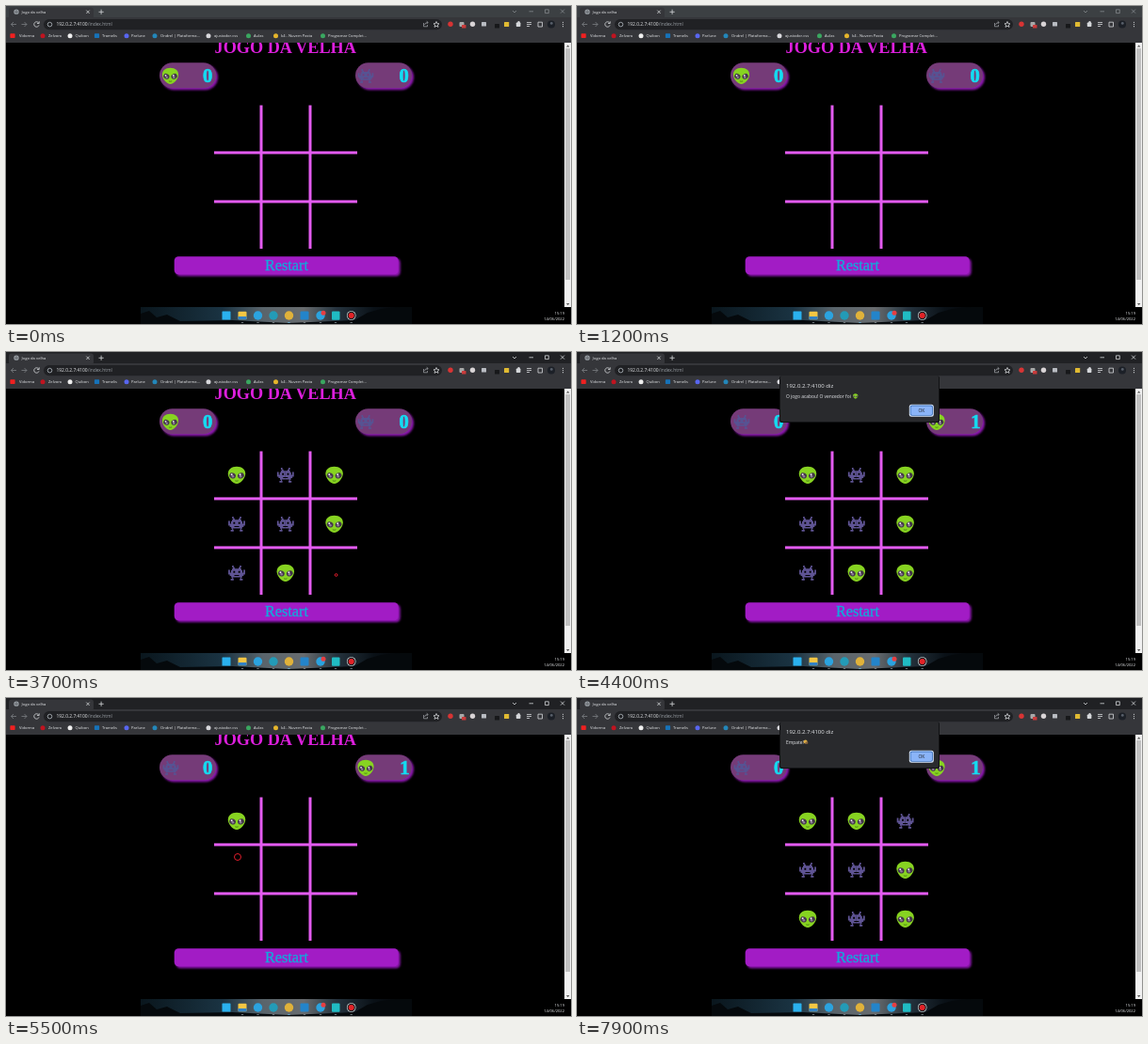
Write an HTML page that moves like this. It is 600 by 338 pixels and loops after 8000 ms.

```html
<!DOCTYPE html>
<html lang="pt-BR">
<head>
<meta charset="utf-8">
<title>Jogo da velha</title>
<style>
html, body { margin: 0; width: 100%; height: 100%; overflow: hidden; background: #000; }
svg { display: block; width: 600px; height: 338px; }
text { font-family: "Open Sans", "Noto Sans", sans-serif; font-size: 4.9px; fill: #e8eaed; }
.serif { font-family: "Liberation Serif", "Noto Serif", serif; }
.title { font-size: 18.2px; font-weight: 700; fill: #dc1fdc; }
.restart { font-size: 16.2px; fill: #13a9dc; stroke: #13a9dc; stroke-width: .3; }
.score { font-size: 20.5px; font-weight: 700; fill: #14dcf2; stroke: #14dcf2; stroke-width: .7; }
.line { fill: none; stroke: #d5d7da; stroke-width: .8; }
.dim { fill: #9aa0a6; }
</style>
</head>
<body>
<svg viewBox="0 0 600 338">
  <defs>
    <clipPath id="page"><rect y="39" width="594" height="281"/></clipPath>
    <filter id="glow" x="-10%" y="-20%" width="120%" height="150%">
      <feDropShadow dx="2" dy="2" stdDeviation=".9" flood-color="#8a18ac"/>
    </filter>
    <linearGradient id="night">
      <stop stop-color="#0a161d"/>
      <stop offset=".3" stop-color="#1a3342"/>
      <stop offset=".45" stop-color="#59646b"/>
      <stop offset=".6" stop-color="#686c6f"/>
      <stop offset=".72" stop-color="#26343f"/>
      <stop offset=".86" stop-color="#0a1117"/>
      <stop offset="1" stop-color="#010203"/>
    </linearGradient>
    <g id="alien">
      <path d="M0-9.6C6-9.6 9.5-6.2 9.5-1.8 9.5 3.4 4.2 9.2 0 9.4-4.2 9.2-9.5 3.4-9.5-1.8-9.5-6.2-6-9.6 0-9.6Z" fill="#87d321"/>
      <g fill="#43364a">
        <ellipse cx="-4.6" cy=".4" rx="3.6" ry="3" transform="rotate(30 -4.6 .4)"/>
        <ellipse cx="4.6" cy=".4" rx="3.6" ry="3" transform="rotate(-30 4.6 .4)"/>
      </g>
      <g fill="#8d7d98"><circle cx="-4.2" cy="1.4" r="1.3"/><circle cx="4.2" cy="1.4" r="1.3"/></g>
      <g fill="#f2edf4"><circle cx="-5.5" cy="-.7" r="1"/><circle cx="3.7" cy="-.7" r="1"/></g>
      <path d="M-1.8 6Q0 6.8 1.8 6" fill="none" stroke="#3f6b12" stroke-width=".8"/>
    </g>
    <path id="half" d="M0-5H2.2V-6.5H3.3V-8.2H5V-6.2H4.2V-5H5.2V-3H6.2V-.5H7.4V-3.5H9.2V1.5H7.6V3.2H6V5H5V6.3H6.6V8H3.3V6H4V4.6H0Z
      M1.8-2.4V-.3H3.7V-2.4ZM0 2V3.1H2.6V2Z" fill-rule="evenodd"/>
    <g id="monster"><use href="#half"/><use href="#half" transform="scale(-1 1)"/></g>
  </defs>
  <g id="stage"></g>
</svg>
<script>
const LOOP = 8000, HOLD = 180, RING = 250;
const stage = document.getElementById("stage");

function add(tag, attrs, parent = stage, content) {
  const el = document.createElementNS("http://www.w3.org/2000/svg", tag);
  for (const key in attrs) el.setAttribute(key, attrs[key]);
  if (content) el.textContent = content;
  return parent.appendChild(el);
}
const group = (parent = stage) => add("g", {}, parent);
const rect = (x, y, width, height, fill, rx = 0, parent) =>
  add("rect", { x, y, width, height, fill, rx }, parent);
const disc = (cx, cy, r, fill, parent) => add("circle", { cx, cy, r, fill }, parent);
const label = (x, y, str, attrs = {}, parent) => add("text", { x, y, ...attrs }, parent, str);
const line = (d, stroke = "#d5d7da") => add("path", { d, class: "line", style: `stroke:${stroke}` });
const show = (el, on) => el.setAttribute("visibility", on ? "visible" : "hidden");
const size = px => ({ style: `font-size:${px}px` });

function sprite(name, x, y, scale, parent, dim) {
  return add("use", {
    href: "#" + name, transform: `translate(${x} ${y}) scale(${scale})`,
    fill: dim ? "#4c5c9c" : "#5f5494", opacity: dim ? .75 : 1
  }, parent);
}

// Browser frame
const strip = rect(0, 0, 600, 13, "#3c4043");
rect(3, 1.5, 90, 12, "#35363a", 3);
rect(0, 12, 600, 27, "#35363a");
disc(11, 6.3, 2.7, "#9aa0a6");
line("M8.5 6.3H13.5M11 3.8V8.8", "#5f6368");
label(16.5, 8.2, "Jogo da velha", size(4.2));
line("M85.3 4.6L88.7 8M88.7 4.6L85.3 8M98.5 6.3H103.7M101.1 3.7V8.9");
const controls = line("M538 5L540 7L542 5M555.5 5.8H560M572.5 3.8H576.3V7.6H572.5ZM589 3.6L593 7.6M593 3.6L589 7.6");

line("M11 19.5H5.5M8 17L5.5 19.5L8 22M16.5 19.5H22M19.5 17L22 19.5L19.5 22", "#7d8084");
line("M34.7 18A2.7 2.7 0 1 0 35 20.4M35.2 16.3V18.5H33");
rect(40, 14, 423, 11.2, "#202124", 5.6);
disc(46.5, 19.6, 2.3, "none").setAttribute("stroke", "#9aa0a6");
const url = label(53.5, 21.4, "192.0.2.7:4100");
add("tspan", { class: "dim" }, url, "/index.html");
line("M443.5 18V21.8H447.5V20M444.5 20Q445 17.5 448 17.5M446.7 16.2L448.2 17.5L446.7 19", "#96999d");
line("M457 16.5L457.9 18.7L460 18.8L458.4 20.2L459 22.4L457 21.1L455 22.4L455.6 20.2L454 18.8L456.1 18.7Z");
disc(472, 19.3, 2.7, "#d83434");
rect(481.5, 17, 5, 5, "#a9a9a9", 1);
rect(484, 20, 4.5, 3.5, "#c93b3b", .5);
disc(495.5, 19.3, 2.7, "#d9d4d6");
rect(505, 17, 5, 4.5, "#b9bcc2", .6);
rect(519, 19, 5, 4.5, "#17181a", .6);
rect(529, 17, 5.2, 5, "#e0ba32", .6);
rect(541.8, 17.5, 4.6, 4.6, "#d5d7da", .8);
disc(544.5, 17.3, 1.2, "#d5d7da");
line("M553 17.5H558M553 19.5H558M553 21.5H556");
line("M565 17.2H569.5V22H565Z");
disc(579, 19.5, 4, "#1c2027");
disc(579.3, 18.4, 1.4, "#59606b");
for (const y of [17.3, 19.5, 21.7]) disc(591.5, y, .6, "#d5d7da");

const bookmarks = [
  [7, 14, "#f02020", "Vidorma"], [39, 45, "#c01420", "Zelvora"],
  [68, 73.5, "#eeeeee", "Quibon"], [96.5, 102, "#1672b8", "Tramelis"],
  [128, 133, "#5866f0", "Parlune"], [158, 164, "#2387ba", "Ondrel | Plataforma..."],
  [215, 221, "#d8d8dc", "ajustador.css"], [257.5, 263, "#3aa760", "Aulas"],
  [286.5, 292, "#e5b52b", "k4 - Nuvem Pasta"], [336.5, 342, "#3aa760", "Programar Complet..."]
];
bookmarks.forEach(([x, tx, color, name], i) => {
  if (i === 0 || i === 3) rect(x - 2.6, 29.3, 5.2, 4.6, color, .7);
  else disc(x, 31.7, 2.5, color);
  label(tx, 33.3, name, size(4.1));
});

// Page
rect(0, 39, 594, 281, "#000");
const page = add("g", { "clip-path": "url(#page)" });
label(296.7, 49.5, "JOGO DA VELHA", { class: "serif title", "text-anchor": "middle" }, page);

const raised = add("g", { filter: "url(#glow)" }, page);
for (const x of [163, 371]) rect(x, 60.3, 60, 27, "#743a78", 13.5, raised);
rect(178.7, 266.3, 238, 19, "#a21bc5", 4.5, raised);
label(298, 280.6, "Restart", { class: "serif restart", "text-anchor": "middle" }, page);

const before = group(page), after = group(page);
const score = (x, value, parent) =>
  label(x, 80.7, value, { class: "serif score", "text-anchor": "middle" }, parent);
sprite("alien", 174.5, 74.5, .9, before);
sprite("monster", 382, 74.5, .9, before, true);
sprite("monster", 175, 74.5, .9, after, true);
sprite("alien", 382, 74.5, .9, after);
score(214.2, "0", page);
score(422.7, "0", before);
score(423.4, "1", after);

for (const n of [0, 52]) {
  rect(269.5 + n, 105.5, 3, 152.5, "#e35bf0", 0, page);
  rect(221, 154.4 + n, 152, 3, "#e35bf0", 0, page);
}

rect(593, 39, 7, 281, "#f1f1f1");
rect(594, 45, 5, 246, "#c1c1c1");
add("path", { d: "M595 43.5L596.7 41.5L598.4 43.5ZM595 316L596.7 318L598.4 316Z", fill: "#505050" });

// Taskbar
rect(0, 320, 600, 18, "#000");
rect(143, 320, 288, 18, "url(#night)");
add("path", {
  d: "M143 338V327L152 324L160 331L171 328L185 335L240 334L300 337L370 334L384 326L398 322L418 320H431V338Z",
  fill: "#05090c"
});
rect(229.5, 324.5, 9, 9, "#2ab1ee", .6);
rect(246.5, 324.8, 9, 8.5, "#f4c644", 1);
rect(246.5, 330, 9, 3.3, "#3382c5", .6);
disc(267.5, 329, 4.7, "#2ba3df");
disc(284, 329, 4.7, "#239bb7");
disc(300.5, 329, 4.7, "#e0b23a");
rect(312.5, 324.5, 9, 9, "#2384ca", 1);
disc(334, 329, 4.7, "#2ba3df");
disc(337, 326.3, 2.5, "#e83e42");
rect(346, 324.5, 8.5, 9.2, "#20bcc4", 1);
disc(366.7, 329, 4.8, "#e9e9e9");
disc(366.7, 329, 4.2, "#191d21");
disc(366.7, 329, 3, "#e32227");
for (const x of [251, 267.5, 284, 300.5, 317, 334, 350, 366.7])
  rect(x - 1.3, 336, 2.6, .8, x === 300.5 ? "#68bfe9" : "#8b959b", .4);
label(593, 327.6, "15:19", { "text-anchor": "end", ...size(4.1) });
label(593, 334, "14/06/2022", { "text-anchor": "end", ...size(4.1) });

// Two rounds: cells are numbered 0 to 8 by rows, aliens play first
const rounds = [
  { cells: [0, 4, 2, 1, 5, 3, 7, 6, 8], end: 4800, alert: 3900, dx: 2, dy: 2,
    clicks: [1300, 1560, 1820, 2080, 2320, 2560, 2900, 3250, 3650] },
  { cells: [0, 3, 1, 2, 6, 4, 5, 7, 8], end: LOOP, alert: 7700, dx: 1, dy: -14,
    clicks: [5000, 5340, 5600, 5850, 6150, 6550, 6950, 7200, 7450] }
];
const moves = rounds.flatMap(({ cells, clicks, end, dx, dy }) => cells.map((cell, i) => {
  const x = 245 + cell % 3 * 51.8, y = 131 + Math.floor(cell / 3) * 52;
  return { at: clicks[i], end, x: x + dx, y: y + dy,
    mark: sprite(i % 2 ? "monster" : "alien", x, y, .97, page) };
}));
const ring = add("circle", { fill: "none", stroke: "#e11d2c" });

// Alert box
const alertBox = group();
rect(215, 25.5, 170, 49.5, "#111214", 2, alertBox);
rect(216, 25, 168, 49, "#292a2d", 2, alertBox);
label(222, 38, "192.0.2.7:4100 diz", size(6), alertBox);
rect(352.8, 55.7, 26, 13, "#dce8fb", 2.5, alertBox);
rect(353.7, 56.6, 24.2, 11.2, "#3f74bd", 2, alertBox);
rect(354.6, 57.4, 22.4, 9.6, "#8ab4f8", 1.4, alertBox);
label(365.8, 64, "OK", { "text-anchor": "middle", style: "fill:#202124" }, alertBox);
const win = group(alertBox), draw = group(alertBox);
label(222, 48.5, "O jogo acabou! O vencedor foi", {}, win);
sprite("alien", 295.7, 47, .28, win);
label(222, 48.5, "Empate!", {}, draw);
disc(242.6, 46.5, 2, "#e0b044", draw);
rect(242.5, 46.5, 2.8, 2.2, "#87633f", .6, draw);

function render(t) {
  const [first, second] = rounds;
  const focused = t >= first.clicks[0];
  const won = t >= first.alert;
  strip.setAttribute("fill", focused ? "#202124" : "#3c4043");
  controls.style.stroke = focused ? "#d5d7da" : "#85898d";
  show(before, !won);
  show(after, won);

  for (const m of moves) show(m.mark, t >= m.at + HOLD && t < m.end);
  const click = moves.find(m => t >= m.at && t < m.at + RING);
  show(ring, click);
  if (click) {
    const p = (t - click.at) / RING;
    ring.setAttribute("cx", click.x);
    ring.setAttribute("cy", click.y);
    ring.setAttribute("r", .4 + 4.8 * p);
  }

  const winOpen = won && t < first.end, drawOpen = t >= second.alert;
  show(alertBox, winOpen || drawOpen);
  show(win, winOpen);
  show(draw, drawOpen);
}

const start = performance.now();
function tick() {
  render((performance.now() - start) % LOOP);
  requestAnimationFrame(tick);
}
tick();
</script>
</body>
</html>
```
